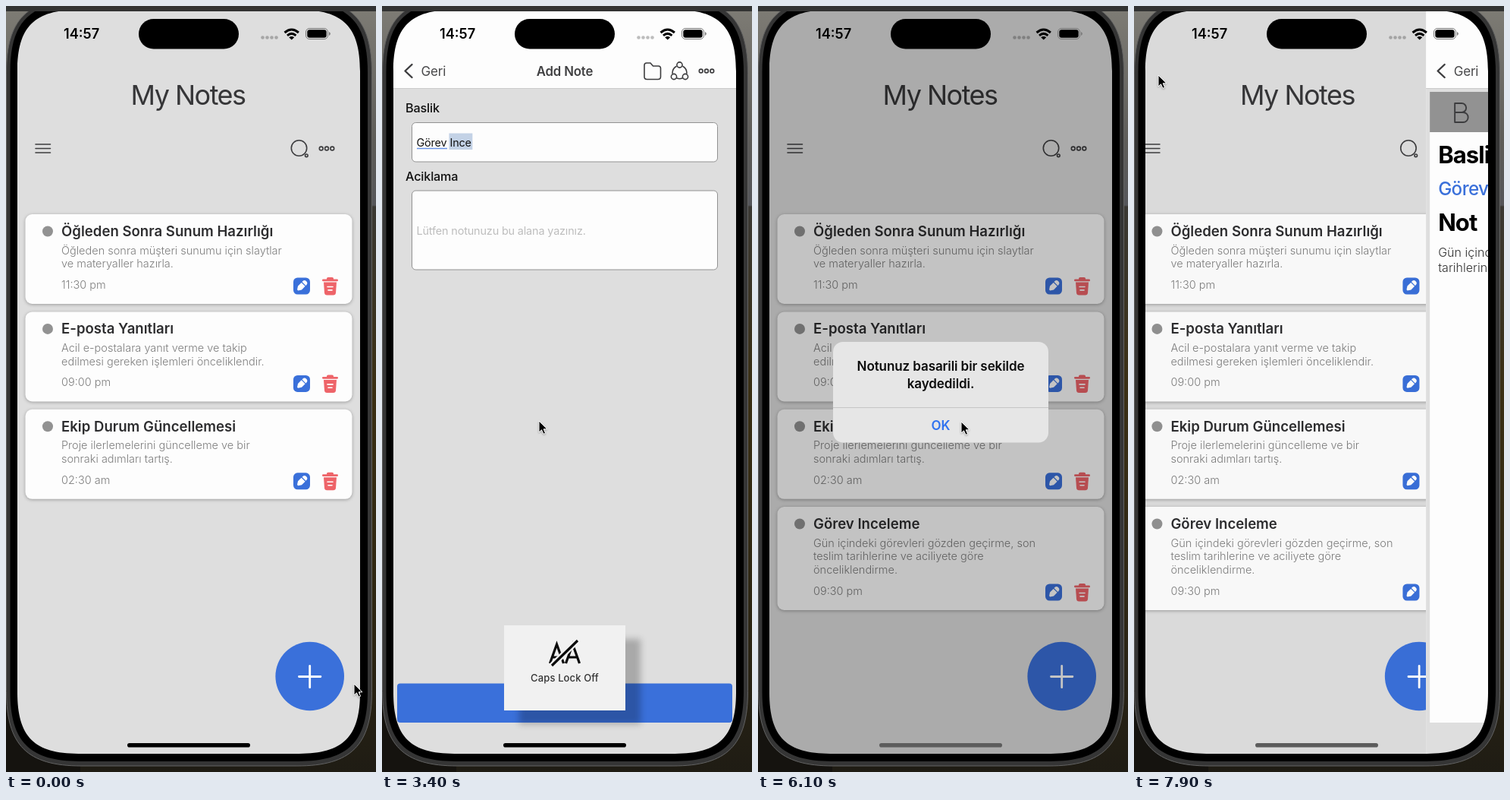
Write an HTML page that moves like this. It is 488 px wide and 1008 px high and loops after 8000 ms.

```html
<!DOCTYPE html>
<html lang="tr">
<head>
<meta charset="utf-8">
<title>My Notes</title>
<style>
html, body { margin: 0; width: 100%; height: 100%; overflow: hidden; background: #26221a; }
svg { display: block; width: 488px; height: 1008px; font-family: Inter, "Open Sans", sans-serif; font-optical-sizing: none; }
text { white-space: pre; }
.mid { text-anchor: middle; }
.end { text-anchor: end; }
.line { fill: none; stroke: #3c3c3e; stroke-width: 1.6; stroke-linecap: round; stroke-linejoin: round; }
.tools .line { stroke-width: 1.9; }
.hero { font-size: 36px; letter-spacing: -.042em; fill: #363638; }
.title { font-size: 18.6px; font-weight: 600; fill: #2d2d2f; }
.body { font-size: 14.5px; font-weight: 300; fill: #7e7e7e; }
.back { font-size: 17px; letter-spacing: -.01em; fill: #48484a; }
.nav { font-size: 16.8px; font-weight: 600; letter-spacing: -.01em; fill: #404042; }
.label { font-size: 16.2px; font-weight: 500; letter-spacing: -.01em; fill: #111; }
.field { font-size: 14.4px; letter-spacing: -.01em; fill: #111; }
.hint { fill: #bdbdbd; }
.save { font-size: 16px; font-weight: 600; letter-spacing: -.01em; fill: #fff; }
.head { font-size: 31px; font-weight: 700; letter-spacing: -.03em; fill: #000; }
.topic { font-size: 24.2px; font-weight: 500; letter-spacing: -.025em; fill: #3a70da; }
.para { font-size: 16px; font-weight: 300; letter-spacing: .002em; fill: #333; }
.alert { font-size: 17px; font-weight: 600; letter-spacing: -.005em; fill: #0c0c0c; }
.clock { font-size: 18.2px; font-weight: 600; fill: #000; }
.caps { font-size: 13px; font-weight: 500; letter-spacing: .01em; fill: #333; }
.box { fill: #fdfdfd; stroke: #929292; }
.card { fill: #fdfdfd; filter: drop-shadow(0 1.5px 2px rgba(0,0,0,.3)); }

#list, #shade, #add, #detail { animation: 8s infinite cubic-bezier(.32,.72,0,1); }
#list { animation-name: list; }
#shade { animation-name: shade; }
#add { animation-name: add; }
#detail { animation-name: detail; }
#newCard { animation: newCard 8s infinite step-end; }
#veil { animation: veil 8s infinite ease-out; }
#dialog { animation: veil 8s infinite ease-out, pop 8s infinite ease-out; transform-origin: 241px 508px; }
#hud { animation: hud 8s infinite linear; filter: drop-shadow(20px 18px 4px rgba(0,0,0,.24)); }
#home { animation: home 8s infinite linear; }
#mouse { animation: mouse 8s infinite ease-in-out; filter: drop-shadow(0 1px 1px rgba(0,0,0,.3)); }

@keyframes list {
  0%, 5.625%, 75.25%, 83.7% { transform: translateX(0); }
  12.375%, 68.5%, 90.45% { transform: translateX(-135.6px); }
  96.97% { transform: translateX(-135.6px); animation-timing-function: cubic-bezier(.514,.571,.257,.881); }
  100% { transform: translateX(-7.5px); }
}
@keyframes shade {
  0%, 5.625%, 75.25%, 83.7% { opacity: 0; }
  12.375%, 68.5%, 90.45% { opacity: .1; }
  96.97% { opacity: .1; animation-timing-function: cubic-bezier(.514,.571,.257,.881); }
  100% { opacity: .006; }
}
@keyframes add {
  0%, 5.625%, 75.25%, 100% { transform: translateX(454px); }
  12.375%, 68.5% { transform: translateX(0); }
}
@keyframes detail {
  0%, 83.7% { transform: translateX(454px); }
  90.45% { transform: translateX(0); }
  96.97% { transform: translateX(0); animation-timing-function: cubic-bezier(.514,.571,.257,.881); }
  100% { transform: translateX(427px); }
}
@keyframes newCard { 0% { opacity: 0; } 68.5%, 100% { opacity: 1; } }
@keyframes veil { 0%, 70.625%, 80.25%, 100% { opacity: 0; } 73.75%, 78.125% { opacity: 1; } }
@keyframes pop { 0%, 70.625% { transform: scale(1.15); } 73.75%, 100% { transform: scale(1); } }
@keyframes hud { 0%, 18%, 49%, 100% { opacity: 0; } 18.1%, 45.5% { opacity: 1; } }
@keyframes home { 0%, 69% { fill: #000; } 73%, 100% { fill: #5c5c5c; } }
@keyframes mouse {
  0%, .75% { transform: translate(459px, 892px); }
  4.4%, 8.5% { transform: translate(406px, 884px); }
  16.25%, 25% { transform: translate(97px, 175px); }
  31.25%, 45% { transform: translate(207px, 546px); }
  52.5%, 65.3% { transform: translate(188px, 296px); }
  67.75%, 69.5% { transform: translate(240px, 914px); }
  75%, 78% { transform: translate(268px, 547px); }
  82.25%, 87.5% { transform: translate(215px, 729px); }
  93%, 100% { transform: translate(32px, 91px); }
}
</style>
</head>
<body>
<script>
const BLUE = '#3a70da', RED = '#ee6469', GREY = '#dedede';

const text = (x, y, str, cls) => `<text x="${x}" y="${y}" class="${cls}">${str}</text>`;
const rect = (x, y, w, h, r, attrs) => `<rect x="${x}" y="${y}" width="${w}" height="${h}" rx="${r}" ${attrs}/>`;
const line = (d, attrs = '') => `<path class="line" d="${d}" ${attrs}/>`;
const ring = (x, y, r) => `<circle class="line" cx="${x}" cy="${y}" r="${r}"/>`;
const dots = (x, y) => [-7.3, 0, 7.3].map(d => ring(x + d, y, 2.4)).join('');
const at = (x, y, body) => `<g transform="translate(${x} ${y})">${body}</g>`;

// Rounded rectangle with continuous (squircle-like) corners.
function squircle(x, y, w, h, r, attrs = '') {
  const a = 1.28 * r, k = .723 * a;
  return `<path d="M${x} ${y + a}c0 ${-k} ${a - k} ${-a} ${a} ${-a}h${w - 2 * a}c${k} 0 ${a} ${a - k} ${a} ${a}
    v${h - 2 * a}c0 ${k} ${k - a} ${a} ${-a} ${a}h${2 * a - w}c${-k} 0 ${-a} ${k - a} ${-a} ${-a}z" ${attrs}/>`;
}

const pencil = rect(-11, -11, 22, 22, 5.5, `fill="${BLUE}"`) +
  `<g transform="rotate(45)" fill="#fff"><path d="M-3.5-3h7v6.500L.8 7.600h-1.600L-3.500 3.500z"/><path d="M-3.500-4.200v-1a3.500 3.500 0 0 1 7 0v1z"/></g>`;
const trash = `<g fill="${RED}">${rect(-10.5, -9, 21, 2.8, 1.4, '')}${rect(-4.5, -11.5, 9, 4, 1.8, '')}
  <path d="M-8.5-5h17l-1 14q-.3 3-3.3 3h-8.4q-3 0-3.3-3z"/></g>
  <path d="M-3.5 1h7M-2.5 5.4h5" stroke="#fff" stroke-width="1.6" stroke-linecap="round"/>`;

function card(y, title, lines, time) {
  const extra = (lines.length - 2) * 18;
  return at(0, y, rect(25.5, 0, 431, 118 + extra, 9, 'class="card"') +
    `<circle cx="55" cy="22.5" r="7" fill="#929292"/>` +
    text(73, 29, title, 'title') +
    lines.map((s, i) => text(73, 52.5 + i * 17.8, s, 'body')).join('') +
    text(73, 98 + extra, time, 'body') +
    at(390, 94.5 + extra, pencil) + at(427.5, 94.5 + extra, trash));
}

const navBar = title => rect(15, 0, 454, 108, 0, 'fill="#fdfdfd"') + rect(15, 108, 454, 1, 0, 'fill="#cbcbcb"') +
  line('M39.5 77 30.5 85.5 39.5 94', 'style="stroke-width:2.4"') +
  text(51.5, 91.5, 'Geri', 'back') + text(241, 91.5, title, 'nav mid');

const page = rect(15, 0, 454, 1000, 0, `fill="${GREY}"`);

const list = page + text(240, 129.5, 'My Notes', 'hero mid') +
  line('M39 182h19.5M39 187.5h19.5M39 193h19.5') +
  ring(386.5, 187, 10.2) + ring(396.3, 196.8, 1.8) + dots(423, 187.5) +
  card(274, 'Öğleden Sonra Sunum Hazırlığı', ['Öğleden sonra müşteri sunumu için slaytlar', 've materyaller hazırla.'], '11:30 pm') +
  card(402.4, 'E-posta Yanıtları', ['Acil e-postalara yanıt verme ve takip', 'edilmesi gereken işlemleri önceliklendir.'], '09:00 pm') +
  card(530.8, 'Ekip Durum Güncellemesi', ['Proje ilerlemelerini güncelleme ve bir', 'sonraki adımları tartış.'], '02:30 am') +
  `<g id="newCard">${card(659, 'Görev Inceleme', ['Gün içindeki görevleri gözden geçirme, son', 'teslim tarihlerine ve aciliyete göre', 'önceliklendirme.'], '09:30 pm')}</g>` +
  `<circle cx="400.7" cy="882" r="45.3" fill="${BLUE}"/>` +
  `<path d="M386.5 882.5h28.4M400.7 868.3v28.4" stroke="#fff" stroke-width="2.8" stroke-linecap="round"/>` +
  rect(15, 0, 590, 1000, 0, 'id="shade"');

const hub = [[392.5, 77.5], [385, 93], [400, 93]].map(([x, y]) => ring(x, y, 3.6)).join('') +
  line('M388 79.5q-5 3-5 9M397 79.5q5 3 5 9M389 95q3.5 1.5 7 0');

const add = page + navBar('Add Note') +
  line('M346 78q0-3 3-3h5l3.5 4h7q3 0 3 3v11q0 3.5-3.5 3.5h-14.5q-3.5 0-3.5-3.5z') + hub + dots(428, 85.5) +
  text(31, 140, 'Baslik', 'label') + rect(39.5, 153.5, 403, 51.5, 5, 'class="box"') +
  text(31, 229.5, 'Aciklama', 'label') + rect(39.5, 243, 403, 104, 5, 'class="box"') +
  `<rect id="mark" y="167.5" height="21.5" fill="#c3d2e6"/>` +
  text(45.5, 185, '', 'field" id="name') +
  `<path id="under" d="M46 187.5h40" stroke="#6a93e6" stroke-width="1.5"/>` +
  text(45.5, 300.5, 'Lütfen notunuzu bu alana yazınız.', 'field hint" id="hint') +
  `<g clip-path="url(#input)">${text(436, 300.5, 'Gün içindeki görevleri gözden geçirme, son teslim tarihlerine ve aciliyete göre önceliklendirme.', 'field end" id="note')}</g>` +
  rect(0, 0, 2, 21, 1, `id="caret" fill="${BLUE}"`) +
  rect(20, 891.5, 442, 51.5, 4, `fill="${BLUE}"`) + text(241, 923, 'Kaydet', 'save mid');

const tools = [
  'M-8-12h9a6 6 0 0 1 0 12h-9zM-8 0h11a6 6 0 0 1 0 13h-11z',
  'M-7-13h14q6 0 6 6v14q0 6-6 6h-14q-6 0-6-6v-14q0-6 6-6zM-6-3v-3h12v3M0-6v12M-2.5 6h5',
  'M-8-12v9a8 8 0 0 0 16 0v-9M-10 11h20',
  'M-13-10h9M-13-3h16M-13 4h12M-13 10h26',
  'M13-10h-9M13-3h-16M13 4h-12M13 10h-26',
  'M-13-10h26M-8-3h16M-13 4h26M-8 10h16'
].map((d, i) => at(61 + i * 72, 140, line(d))).join('');

const detail = page + navBar('Not Detail') +
  rect(20, 113, 442, 830, 0, 'fill="#fdfdfd"') + rect(20, 113, 442, 53, 0, 'fill="#929292"') +
  `<g class="tools">${tools}</g>` +
  text(31, 207, 'Baslik', 'head') + text(31, 249, 'Görev Inceleme', 'topic') + text(31, 296, 'Not', 'head') +
  text(31, 330, 'Gün içindeki görevleri gözden geçirme, son teslim', 'para') +
  text(31, 350, 'tarihlerine ve aciliyete göre önceliklendirme.', 'para');

const dialog = rect(99, 442, 284, 132.5, 13, 'fill="#e6e6e6"') + rect(99, 528, 284, 1, 0, 'fill="#c6c6c6"') +
  text(241, 479.5, 'Notunuz basarili bir sekilde', 'alert mid') + text(241, 502.5, 'kaydedildi.', 'alert mid') +
  text(241, 558, 'OK', 'alert mid" style="fill:#2f72f0');

const slash = 'M224 868 258 835';
const hud = rect(161, 815, 160, 112, 0, 'fill="#f1f1f1"') +
  `<g fill="none" stroke="#0a0a0a" stroke-width="3.2"><path d="M221.5 865 230.5 840 239.5 865M224.5 857h12M242.5 865 251.5 840 260.5 865M245.5 857h12"/>
  <g id="slash"><path d="${slash}" stroke="#f1f1f1" stroke-width="8"/><path d="${slash}"/></g></g>` +
  text(241, 889, 'Caps Lock Off', 'caps mid" id="lock');

const status = rect(175, 17, 132, 39.5, 19.7, '') + text(76, 43.3, '14:57', 'clock') +
  [338.5, 344.5, 350.5, 356.5].map(x => `<circle cx="${x}" cy="41.5" r="2.3" fill-opacity=".25"/>`).join('') +
  `<path d="M367.5 35q9.2-8 18.4 0M371 38.8q5.7-4.8 11.4 0" fill="none" stroke="#000" stroke-width="3"/><path d="M373.2 41.2q3.5-2.6 7 0l-3.5 3.4z"/>` +
  rect(395.5, 29.5, 29, 14, 4.6, 'fill="none" stroke="#777"') + rect(397.3, 31.3, 25.4, 10.4, 3, '') +
  `<path d="M426 34v5q1.8-.8 1.8-2.5t-1.8-2.5z" fill="#777"/>`;

document.body.innerHTML = `<svg viewBox="0 0 488 1008">
<defs>
  <linearGradient id="desk" x2="0" y2="1">
    <stop stop-color="#7e7c75"/><stop offset=".18" stop-color="#5d5c59"/><stop offset=".26" stop-color="#55565a"/>
    <stop offset=".262" stop-color="#3b3934"/><stop offset=".5" stop-color="#3a2f14"/>
    <stop offset=".85" stop-color="#2a2414"/><stop offset="1" stop-color="#1f1c14"/>
  </linearGradient>
  <clipPath id="screen">${squircle(15, 5, 452, 979, 63)}</clipPath>
  <clipPath id="input">${rect(45, 244, 393, 102, 0, '')}</clipPath>
</defs>
${rect(0, 0, 488, 1008, 0, 'fill="url(#desk)"')}
${rect(0, 900, 98, 108, 0, 'fill="#15130f"')}
${squircle(.5, -10, 482, 1010, 77, 'fill="#353535" stroke="#626262"')}
${squircle(5.5, -5, 471.5, 999, 72)}
<g clip-path="url(#screen)">
  <g id="list">${list}</g><g id="add">${add}</g><g id="detail">${detail}</g>
  ${rect(15, 0, 454, 1000, 0, 'id="veil" fill-opacity=".23"')}
</g>
<g id="dialog">${dialog}</g>
<g id="hud">${hud}</g>
${status}
${rect(160, 970, 162, 5.6, 2.8, 'id="home"')}
${rect(0, 0, 488, 7, 0, 'fill="#333"')}
<path id="mouse" d="M0 0V15L3.5 11.8 6 17.3 8.6 16.2 6.2 10.8H11Z" stroke="#fff"/>
</svg>`;

const typed = [
  [0, ''], [1600, 'G'], [1850, 'Go'], [2050, 'Gor'], [2200, 'Gore'], [2350, 'Gorev'], [2560, 'Görev '],
  [2800, 'Görev I'], [2900, 'Görev In'], [3000, 'Görev Inc'], [3100, 'Görev Ince'],
  [3550, 'Görev Incel'], [3650, 'Görev Incele'], [3780, 'Görev Incelem'], [3900, 'Görev Inceleme']
];
const el = id => document.getElementById(id);
const show = (id, on) => { el(id).style.display = on ? '' : 'none'; };
const put = (id, attrs) => { for (const k in attrs) el(id).setAttribute(k, attrs[k]); };
const within = (t, a, b) => t >= a && t < b;
const clock = el('mouse').getAnimations()[0];

function draw() {
  const t = (clock.currentTime || 0) % 8000;
  const word = typed.findLast(k => k[0] <= t)[1];
  const name = el('name');
  if (name.textContent !== word) name.textContent = word;

  const marked = within(t, 2800, 4000);
  show('mark', marked);
  if (marked) {
    const left = 45.5 + name.getSubStringLength(0, 6);
    put('mark', { x: left - 1, width: 45.5 + name.getComputedTextLength() - left + 2.5 });
  }
  show('under', within(t, 2560, 4250));

  const pasted = t >= 4700, inNote = t >= 4250;
  show('hint', !pasted);
  show('note', pasted);
  show('caret', within(t, 1400, 2800) || within(t, 4000, 5500));
  const end = word ? name.getComputedTextLength() : 0;
  put('caret', inNote ? { x: pasted ? 435 : 45, y: 285 } : { x: 45 + end, y: 169 });

  const capsOn = t < 1650 || within(t, 2740, 2880);
  show('slash', !capsOn);
  el('lock').textContent = capsOn ? 'Caps Lock On' : 'Caps Lock Off';
  requestAnimationFrame(draw);
}
draw();
</script>
</body>
</html>
```
